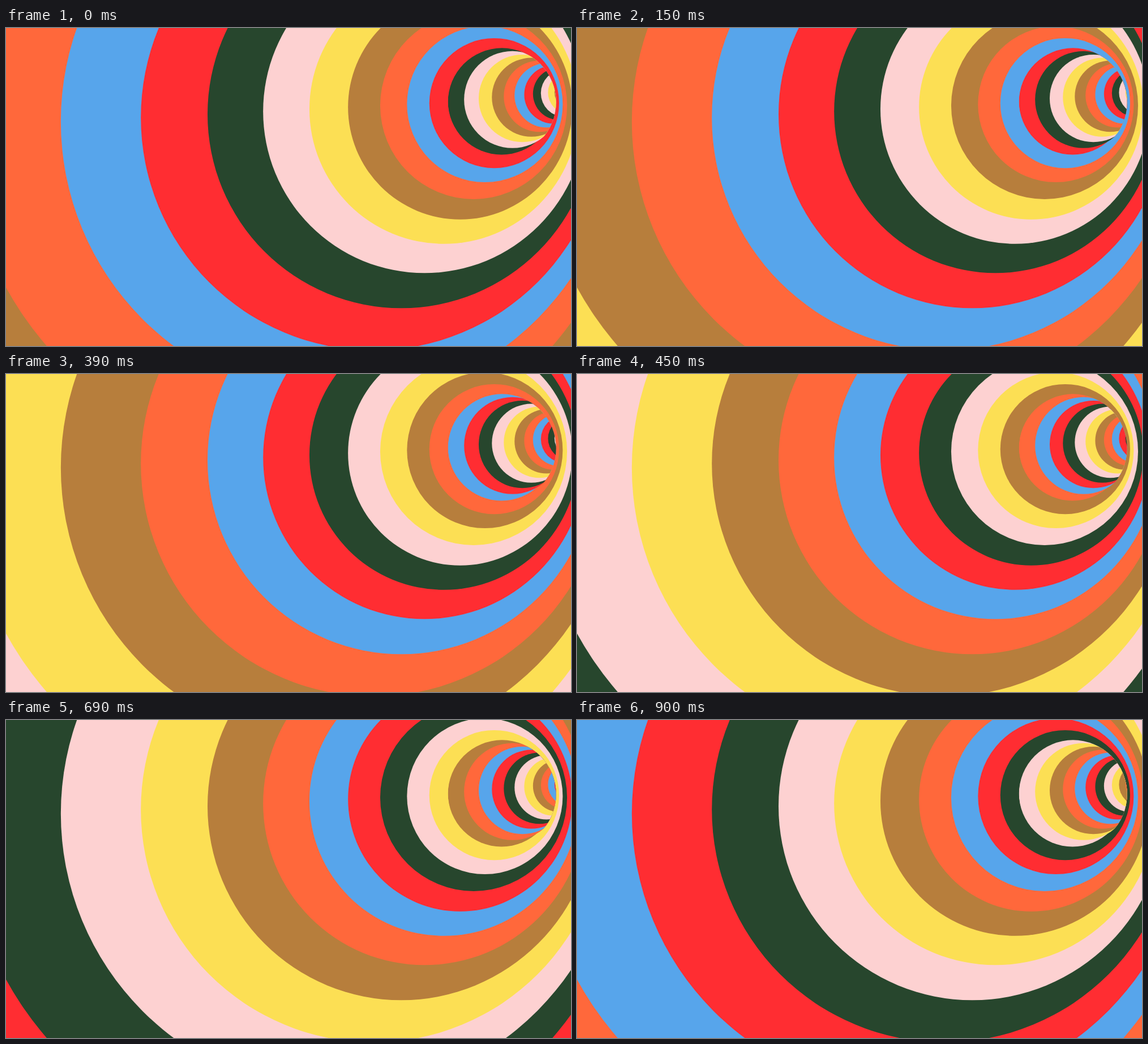
Write an HTML page that moves like this. It is 998 px wide and 561 px high and loops after 1050 ms.

```html
<!DOCTYPE html>
<html lang="en">
<head>
<meta charset="utf-8">
<title>Ring tunnel</title>
<style>
  html, body { margin: 0; width: 100%; height: 100%; overflow: hidden; }
  svg { display: block; width: 100%; height: 100%; }
</style>
</head>
<body>
<svg id="stage" viewBox="0 0 998 561" preserveAspectRatio="none">
  <defs><clipPath id="hole"></clipPath></defs>
  <rect width="998" height="561"></rect>
  <g id="outer"></g>
  <g id="inner" clip-path="url(#hole)"></g>
</svg>
<script>
const COLORS = ['#b77e3c', '#ff683b', '#57a5eb', '#ff2d32', '#27462d', '#fdd1d1', '#fcdf54'];
const STEP = 150;
const OUTER = 10;
const INNER = 11;

const $ = id => document.getElementById(id);

function addCircle(parent, { cx, cy, r }) {
  const c = document.createElementNS('http://www.w3.org/2000/svg', 'circle');
  c.setAttribute('cx', cx);
  c.setAttribute('cy', cy);
  c.setAttribute('r', r);
  parent.appendChild(c);
  return c;
}

// Both series shrink geometrically towards a vanishing point.
function outerRing(i) {
  const r = 591.4 / 1.2 ** i;
  return { cx: 945 - 0.721 * r, cy: 122.7 + 0.0857 * r, r };
}

function innerRing(i) {
  const r = 94.75 * 0.9025 ** i;
  return { cx: 1073.9 - 2.096 * r, cy: 104.1 + 0.26 * r, r };
}

const rings = [document.querySelector('rect')];
for (let i = 0; i < OUTER; i++) rings.push(addCircle($('outer'), outerRing(i)));
for (let i = 0; i < INNER; i++) rings.push(addCircle($('inner'), innerRing(i)));
addCircle($('hole'), outerRing(OUTER));

// Each step passes every colour on to the next ring inwards.
function draw(ms) {
  const n = COLORS.length;
  const step = Math.floor(ms / STEP) % n;
  rings.forEach((ring, i) => ring.setAttribute('fill', COLORS[(i - step + n) % n]));
}

function tick() {
  draw(performance.now());
  requestAnimationFrame(tick);
}

tick();
</script>
</body>
</html>
```
